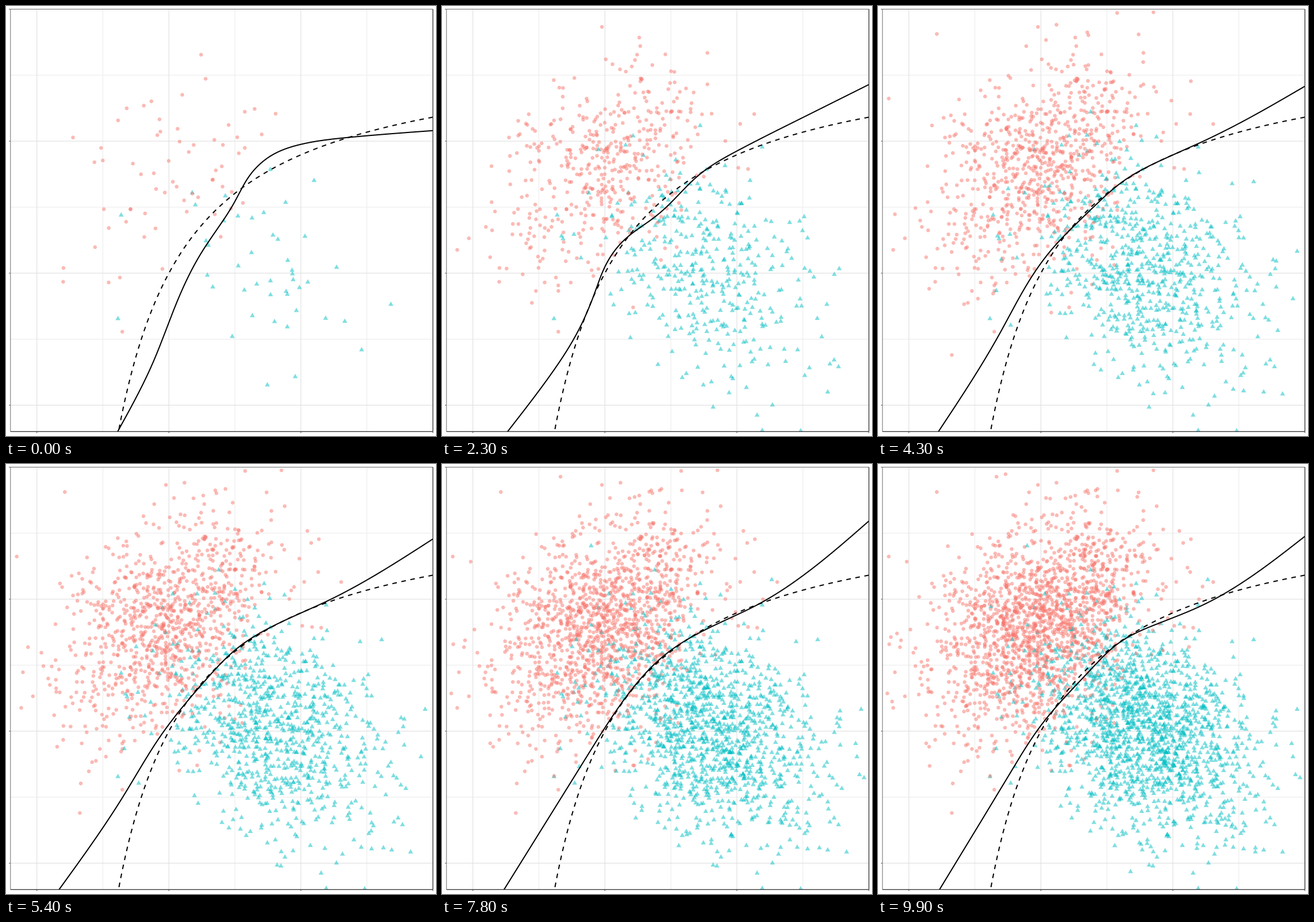
A matplotlib script for the animation above (10 s loop, 748 px wide and 748 px high).

```python
import numpy as np
import matplotlib.pyplot as plt
from matplotlib.animation import FuncAnimation
from matplotlib.collections import PathCollection
from matplotlib.path import Path
from matplotlib.transforms import IdentityTransform

SIZE, FRAMES = 748, 100
LEFT, TOP, SIDE = 7.8, 5.5, 734.8  # panel, in pixels
LO, HI = -3, 5                     # panel, in data units
UNIT = SIDE / (HI - LO)
PX = 0.72                          # points per pixel
START, STEP, RHO = 110, 33, 0.3    # sample sizes, correlation
RED, TEAL = (0.973, 0.463, 0.427, 0.5), (0, 0.749, 0.769, 0.5)
DOT = Path.circle(radius=3.25)
TRI = Path([(0, 4.2), (4.3, -3.4), (-4.3, -3.4), (0, 4.2)], closed=True)

# Two normal classes with opposite correlation
rng = np.random.default_rng(11)
total = START + STEP * (FRAMES - 1)
is_red = rng.random(total) < 0.52
sign = np.where(is_red, 1, -1)
z = rng.normal(size=(total, 2))
spots = np.c_[1 - sign + z[:, 0],
              1 + sign + sign * RHO * z[:, 0] + np.sqrt(1 - RHO**2) * z[:, 1]]
marks = [DOT if r else TRI for r in is_red]
colors = [RED if r else TEAL for r in is_red]

# Their equal-density boundary is a hyperbola
bx = np.linspace(HI, -1.2, 500)
by = (4 + 4 * RHO) * bx / (4 * RHO * bx + 4 - 4 * RHO)

# Key shapes of the fitted boundary, by step
fits = {
    0: [(-0.97, -3), (-0.30, -1.69), (0.13, -0.60), (0.63, 0.41),
        (1.24, 1.34), (1.53, 1.85), (1.96, 2.24), (2.50, 2.44),
        (3.39, 2.57), (5, 2.70)],
    15: [(-1.88, -3), (-0.96, -2.01), (-0.34, -1.15), (-0.09, -0.50),
         (0.07, 0.14), (0.43, 0.65), (0.96, 0.99), (1.40, 1.39),
         (1.87, 1.92), (2.50, 2.38), (5, 3.69)],
    32: [(-1.80, -3), (-0.71, -1.07), (0.21, 0.51), (1.05, 1.26),
         (1.62, 1.77), (2.50, 2.24), (3.74, 2.80), (5, 3.44)],
    54: [(-2.08, -3), (-0.85, -1.21), (-0.15, -0.08), (0.67, 0.94),
         (1.32, 1.59), (2.03, 2.02), (3.01, 2.47), (5, 3.64)],
    78: [(-1.91, -3), (-0.53, -0.78), (0.01, 0.08), (1.22, 1.51),
         (1.98, 1.96), (2.90, 2.40), (3.77, 2.96), (5, 3.98)],
    99: [(-1.92, -3), (-0.58, -0.79), (0.01, 0.12), (0.89, 1.11),
         (1.49, 1.68), (2.25, 2.05), (3.07, 2.39), (5, 3.69)],
}


def smooth(points, n=240):
    """Natural cubic spline, evenly sampled along its chords."""
    p = np.array(points, float)
    k = len(p)
    h = np.hypot(*np.diff(p, axis=0).T)
    t = np.r_[0, h.cumsum()]
    slope = np.diff(p, axis=0) / h[:, None]
    a, rhs = np.eye(k), np.zeros((k, 2))
    for i in range(1, k - 1):
        a[i, i - 1:i + 2] = h[i - 1], 2 * (h[i - 1] + h[i]), h[i]
        rhs[i] = 6 * (slope[i] - slope[i - 1])
    m = np.linalg.solve(a, rhs)
    s = np.linspace(0, t[-1], n)
    i = np.clip(np.searchsorted(t, s) - 1, 0, k - 2)
    w = h[i][:, None]
    u, v = (t[i + 1] - s)[:, None], (s - t[i])[:, None]
    return ((m[i] * u**3 + m[i + 1] * v**3) / (6 * w)
            + (p[i] / w - m[i] * w / 6) * u
            + (p[i + 1] / w - m[i + 1] * w / 6) * v)


steps = list(fits)
curves = [smooth(p) for p in fits.values()]


def boundary(f):
    i = min(np.searchsorted(steps, f, side="right"), len(steps) - 1)
    u = (f - steps[i - 1]) / (steps[i] - steps[i - 1])
    return (1 - u) * curves[i - 1] + u * curves[i]


fig = plt.figure(figsize=(SIZE / 100, SIZE / 100), dpi=100, facecolor="white")
ax = fig.add_axes([LEFT / SIZE, 1 - (TOP + SIDE) / SIZE,
                   SIDE / SIZE, SIDE / SIZE])
ax.set(xlim=(LO, HI), ylim=(LO, HI))
ax.axis("off")


def rule(x, y, color, width=1.0, z=0):
    ax.plot(x, y, color=color, lw=width * PX, zorder=z, snap=False,
            solid_capstyle="butt", clip_on=False)


span, tick = (LO, HI), (LO - 2.7 / UNIT, LO)
for g in (-1.25, 1.25, 3.75):
    rule((g, g), span, "#ebebeb")
    rule(span, (g, g), "#ebebeb")
for g in (-2.5, 0, 2.5, 5):
    rule((g, g), span, "#dcdcdc")
    rule(span, (g, g), "#dcdcdc")
    rule((g, g), tick, "#555555")
    rule(tick, (g, g), "#555555")

cloud = PathCollection(marks, offsets=spots, offset_transform=ax.transData,
                       facecolors=colors, edgecolors="none", zorder=2)
cloud.set_transform(IdentityTransform())
ax.add_collection(cloud, autolim=False)
ax.plot(bx, by, color="black", lw=2 * PX, ls=(0, (4, 4)),
        dash_capstyle="butt", zorder=3)
fit, = ax.plot([], [], color="black", lw=2 * PX, zorder=3)

for edge, color, width in ((LO, "#333333", 1.3), (HI, "#6a6a6a", 1)):
    rule(span, (edge, edge), color, width, 5)
for edge, color, width in ((HI, "#333333", 1.3), (LO, "#6a6a6a", 1)):
    rule((edge, edge), span, color, width, 5)


def update(f):
    n = START + STEP * f
    cloud.set_paths(marks[:n])
    cloud.set_offsets(spots[:n])
    fit.set_data(*boundary(f).T)
    return cloud, fit


anim = FuncAnimation(fig, update, frames=FRAMES, interval=100, repeat=True,
                     repeat_delay=0, blit=False)
plt.show()
```
